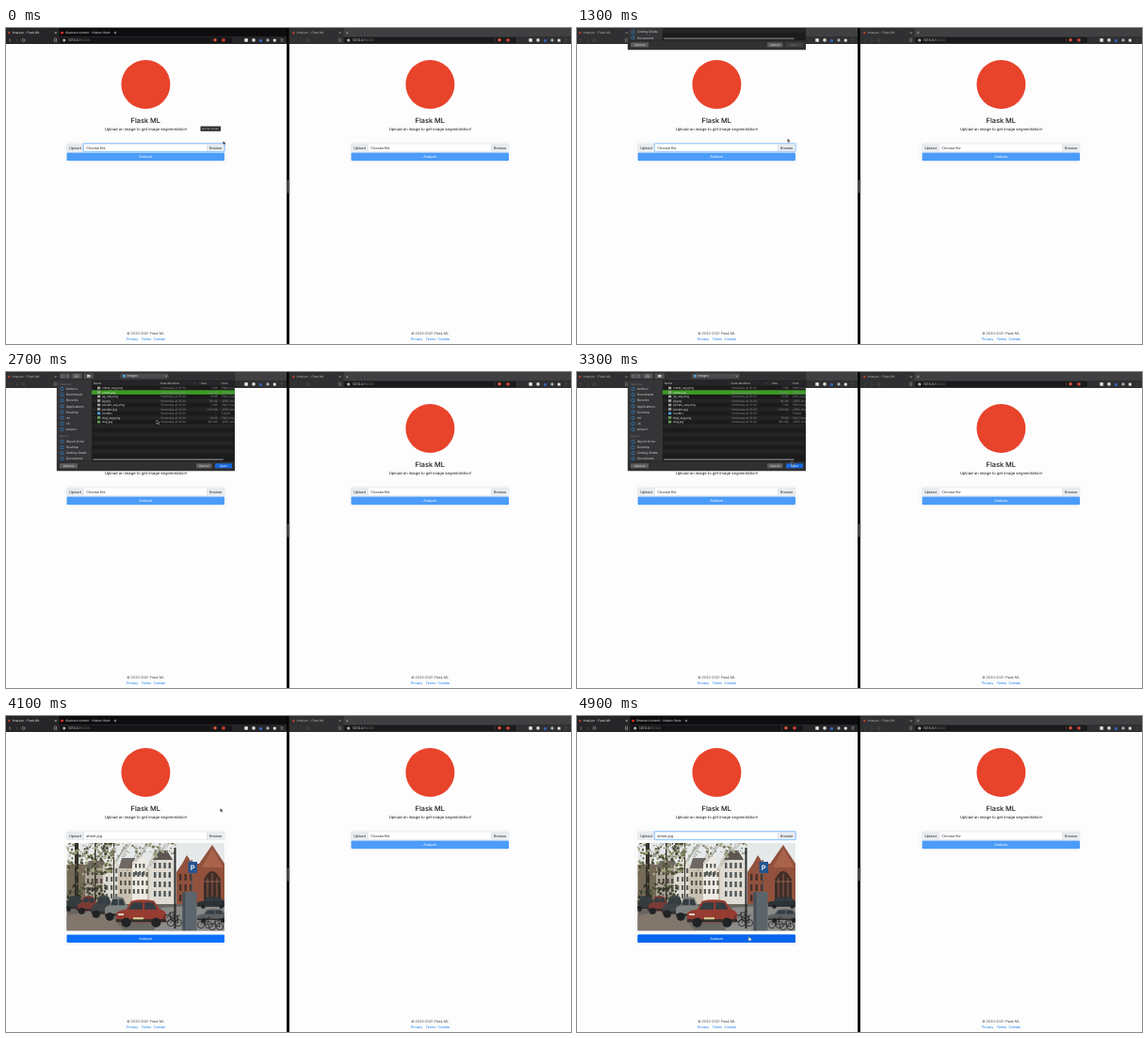
Animation, 600 px wide and 336 px high, one loop 5000 ms. Source, as an HTML page:

```html
<!DOCTYPE html>
<html lang="en">
<head>
<meta charset="utf-8">
<title>Flask ML</title>
<style>
html, body { margin: 0; width: 100%; height: 100%; overflow: hidden; background: #fff; }
svg { display: block; width: 100vw; height: 100vh; }
text { font-family: Inter, Roboto, sans-serif; text-rendering: geometricPrecision; white-space: pre; }
.loop { animation: 5s linear infinite; }
.cut { animation-timing-function: step-end; }
#tooltip { animation-name: tooltip; }
#cursor { animation-name: cursor; }
#arrow { animation-name: arrow; }
#hand { animation-name: hand; }
#focus { animation-name: focus; }
#sheet { animation-name: sheet; }
.selected { animation-name: selected; }
#hover { animation-name: hover; }
.idle { animation-name: idle; }
.before { animation-name: before; }
.after { animation-name: after; }

@keyframes tooltip { 0% { opacity: 1 } 3.8%, 100% { opacity: 0 } }
@keyframes before { 0% { opacity: 1 } 81.6%, 100% { opacity: 0 } }
@keyframes after { 0% { opacity: 0 } 81.6%, 100% { opacity: 1 } }
@keyframes idle { 0% { opacity: 0 } 25.8% { opacity: 1 } 81.6%, 100% { opacity: 0 } }
@keyframes selected { 0% { opacity: 0 } 45.8%, 100% { opacity: 1 } }
@keyframes arrow { 0% { opacity: 1 } 96.5%, 100% { opacity: 0 } }
@keyframes hand { 0% { opacity: 0 } 96.5%, 100% { opacity: 1 } }
@keyframes hover { 0%, 96% { opacity: 0 } 98%, 100% { opacity: 1 } }
@keyframes focus { 0%, 25.6% { opacity: 1 } 27.6%, 82.4% { opacity: 0 } 85.6%, 100% { opacity: 1 } }
@keyframes sheet {
  0%, 25.7% { transform: translateY(-110px); visibility: hidden }
  25.8% { transform: translateY(-90px); visibility: visible; animation-timing-function: ease-out }
  29.8%, 81.5% { transform: none; visibility: visible }
  81.6%, 100% { transform: none; visibility: hidden }
}
@keyframes cursor {
  0%, 2% { transform: translate(230.5px, 120px); animation-timing-function: ease-in-out }
  12%, 30% { transform: translate(223.5px, 117.5px); animation-timing-function: ease-in-out }
  39.8% { transform: translate(116px, 25.5px) }
  45% { transform: translate(114.5px, 21px); animation-timing-function: ease-in-out }
  53.8%, 56% { transform: translate(160px, 51px); animation-timing-function: ease-in-out }
  67% { transform: translate(229px, 96px) }
  78%, 80.8% { transform: translate(229px, 97.5px) }
  82%, 90% { transform: translate(227.5px, 98px); animation-timing-function: ease-in-out }
  97.8%, 100% { transform: translate(182px, 234.5px) }
}
</style>
</head>
<body>
<script>
const rect = (x, y, w, h, fill, more = '') =>
  `<rect x="${x}" y="${y}" width="${w}" height="${h}" fill="${fill}" ${more}/>`;
const dot = (x, y, r, fill) => `<circle cx="${x}" cy="${y}" r="${r}" fill="${fill}"/>`;
const line = (d, stroke, width = .5) =>
  `<path d="${d}" fill="none" stroke="${stroke}" stroke-width="${width}"/>`;
const shape = (d, fill) => `<path d="${d}" fill="${fill}"/>`;
// Text is placed by its vertical middle.
const text = (x, y, size, str, fill = '#212529', more = '') =>
  `<text x="${x}" y="${y + size * .36}" font-size="${size}" fill="${fill}" ${more}>${str}</text>`;
const middle = 'text-anchor="middle"';
const group = (body, attrs) => `<g ${attrs}>${body}</g>`;
const repeat = (n, draw) => Array.from({ length: n }, (_, i) => draw(i)).join('');

let seed = 7;
const random = () => (seed = seed * 16807 % 2147483647) / 2147483647;
const pick = list => list[Math.floor(random() * list.length)];

function cross(x, y, color) {
  return line(`M${x - 1} ${y - 1}l2 2m0 -2l-2 2`, color, .45);
}

function chrome(active, tabs) {
  const strip = active ? '#0d0d10' : '#404042';
  const bar = active ? '#262629' : '#303032';
  const ink = active ? '#ececec' : '#b8b8b8';
  const nav = active ? '#cfcfcf' : '#5c5c5e';
  let out = rect(-1.2, 0, 299.2, 9.5, strip) + rect(-1.2, 0, 57.7, 9.5, bar) + rect(-1.2, 9, 299.2, 8, bar) +
    rect(57, 9.9, 183, 6.2, active ? '#151517' : '#1b1b1d', 'rx="1"') +
    dot(3.3, 5, 1.2, '#c43d2d') + text(6.6, 5, 3.25, 'Analyze - Flask ML', ink) + cross(52.7, 5, ink) +
    line('M5 11.4l-1.7 1.5l1.7 1.5', nav) + line('M10.5 11.4l1.7 1.5l-1.7 1.5', '#5c5c5e') +
    `<circle cx="18.5" cy="12.9" r="1.5" fill="none" stroke="${nav}" stroke-width=".5"/>` +
    line('M51.5 11.2h2v3.5l-1-.8l-1 .8z', ink, .4) +
    dot(61.7, 12.9, 1.5, '#d0d0d0') + rect(61.5, 12.6, .5, 1.2, '#222') +
    text(66, 13, 3.5, '127.0.0.1<tspan fill="#77777a">:5000</tspan>', '#f2f2f2') +
    line('M217.5 10.5v5', '#55555a', .4) +
    dot(222, 12.7, 1.7, '#e05a38') + dot(231, 12.8, 1.9, '#c3402f') +
    rect(253.3, 11.2, 3.5, 3.5, '#e8e8e8') + dot(263, 12.9, 1.8, '#d9d9d9') +
    dot(270.5, 13.4, 1.6, '#3566bd') + dot(278, 12.9, 1.6, '#a9b4b4') +
    rect(283.8, 11.7, 2.9, 2.9, '#e3e3e3') +
    line('M291.5 11.6h3m-3 1.3h3m-3 1.3h3', nav, .4);
  const plus = tabs > 1 ? 116 : 60.3;
  if (tabs > 1) {
    out += rect(58.2, 3.9, 2.7, 2.4, '#e02b24') +
      text(63, 5, 3.2, 'Channel content - Vidarro Stu', ink) + cross(109.3, 5, ink);
  }
  return out + line(`M${plus - 1.3} 5h2.6m-1.3 -1.3v2.6`, ink, .5);
}

function field(label) {
  return rect(64.5, 122.9, 167.5, 8.5, '#fff', 'rx="1" stroke="#ced4da" stroke-width=".5"') +
    rect(64.7, 123.1, 17.6, 8.1, '#e9ecef') + rect(213.5, 123.1, 18.3, 8.1, '#e9ecef') +
    line('M82.3 123v8.5M213.5 123v8.5', '#ced4da') +
    text(73.4, 127.3, 3.75, 'Upload', '#25292d', middle) + text(85.3, 127.3, 3.75, label, '#25292d') +
    text(222.6, 127.3, 3.75, 'Browse', '#25292d', middle);
}

function button(y, color) {
  return rect(64.5, y, 167.5, 8.7, color, 'rx="1"') + text(148.2, y + 4.5, 3.7, 'Analyze', '#fff', middle);
}

function card(h) {
  return rect(62, 120.8, 172.3, h, '#fdfdfd', 'rx="1.2" stroke="#eff0f1" stroke-width=".5"');
}

const emptyForm = () => card(22.6) + field('Choose file') + button(132.6, '#4c9cf9');

function page() {
  const link = '#0470ee';
  return rect(-1.2, 16.5, 299.2, 320, '#fdfdfd') + dot(148.4, 60, 26, '#e8432b') +
    text(148.3, 98, 7.4, 'Flask ML', '#16191c', `${middle} font-weight="500"`) +
    text(148.4, 107.6, 4.15, 'Upload an image to get image segmentation!', '#16191c', middle) +
    text(148.2, 324.2, 3.7, '© 2020-2021 Flask ML', '#454a50', middle) +
    text(128, 330.8, 3.5, 'Privacy', link) + text(143.8, 330.8, 3.5, 'Terms', link) +
    text(156.6, 330.8, 3.5, 'Codwik', link);
}

function panes(x, y, cols, rows, dx, dy, w, h, color) {
  return repeat(cols * rows, i =>
    rect(x + i % cols * dx, y + Math.floor(i / cols) * dy, w, h, color));
}

function car(x, y, w, h, body) {
  const wheel = h * .17;
  return group(
    shape('M0 .5Q.05 .38 .2 .36L.3 .06Q.5 -.03 .76 .05L.88 .36Q1 .4 1 .56V.82H0Z', body) +
    shape('M.24 .36L.33 .11H.53V.36ZM.57 .11H.74L.82 .36H.57Z', '#343d42') +
    rect(0, .7, 1, .1, '#30302f'),
    `transform="translate(${x} ${y}) scale(${w} ${h})"`) +
    dot(x + w * .2, y + h * .82, wheel, '#202224') + dot(x + w * .8, y + h * .82, wheel, '#202224');
}

function bike(x, y) {
  return [0, 8].map(dx =>
    `<circle cx="${x + dx}" cy="${y}" r="3.6" fill="none" stroke="#222426" stroke-width=".8"/>`).join('') +
    line(`M${x} ${y}l3 -6h4l1 6l-4 -1l-1 -5m4 0l1 -2h2`, '#222426', .8);
}

function foliage(n, x, y, w, h, colors) {
  return repeat(n, () => dot(x + random() * w, y + random() * h, .5 + random() * 1.2, pick(colors)));
}

function photo() {
  const sky = rect(64, 135, 169, 94, '#e6e9ea');
  const houses =
    rect(64, 158, 22, 42, '#756a58') + rect(84, 160, 21, 40, '#aea596') +
    shape('M84 162L88 154H104L107 162Z', '#716961') +
    shape('M103 200V159L112 150L121 159V200Z', '#dcd9d0') +
    shape('M119 164L123 151H137L139 164Z', '#6f6762') + rect(119, 162, 39, 38, '#c9c0b1') +
    shape('M134 200V156L142 145L150 156V200Z', '#eceae2') +
    shape('M152 200V153L157 146H173L179 153V200Z', '#dfdbd2') +
    shape('M156 153L163 143H171L177 153Z', '#5d5651') +
    shape('M181 200V166L187 157L192 148L198 157H205L219 137L232 157V200Z', '#91513c') +
    shape('M208 161L219 141L231 161Z', '#a9634a') +
    panes(86, 164, 4, 3, 4.7, 9, 2.2, 5, '#4d4843') +
    panes(106, 162, 3, 4, 5, 9, 2.2, 5, '#5d6260') +
    panes(121, 166, 7, 3, 4.6, 9, 2.1, 5, '#55554f') +
    panes(137, 157, 3, 2, 4.2, 8, 2, 4.5, '#565c5a') +
    panes(157, 156, 4, 4, 5.2, 10, 2.4, 6, '#50585a') +
    panes(184, 168, 3, 3, 5.5, 11, 2.4, 7, '#43302a') +
    shape('M210 200V174Q219 156 228 174V200Z', '#3f2d28') +
    line('M214 198V172M219 198V167M224 198V172M210 176h18', '#b0735a', .7);
  const tree = (x, w, top = 135) => rect(x, top, w, 200 - top, '#342f28');
  const twigs = repeat(20, i =>
    line(`M${68 + i * 5} ${165 - i % 4 * 5}q${6 + i % 5} -14 ${12 + i % 3 * 5} -${22 + i % 3 * 3}`, '#5a574b', .35));
  const leaves = foliage(190, 64, 135, 50, 34, ['#5f6342', '#7d8057', '#484b36', '#a3a583']) +
    foliage(70, 110, 135, 72, 15, ['#77785b', '#a2a48a']) +
    foliage(90, 64, 178, 42, 20, ['#3d4431', '#525a3c', '#2f332a']);
  const ground = rect(64, 200, 169, 30, '#69655f') +
    shape('M64 212L104 205L126 228.5H64Z', '#81766c') + shape('M165 204L233 199V229H157Z', '#8b8b89');
  const cars = car(62, 191, 20, 17, '#343b3d') + car(76, 191, 22, 20, '#7c3a34') +
    car(91, 191, 24, 24, '#3f4546') + car(105, 192, 26, 26, '#7d8280') + car(203, 192, 32, 13, '#2c3338') +
    car(203, 205, 34, 15, '#5b6063') + car(117, 195, 53, 30, '#963c31') +
    rect(119, 210, 6, 2, '#d9d0c3') + rect(135, 214, 11, 2.3, '#d3c28b');
  const street = bike(171, 215) + bike(175, 220) + rect(178.5, 140, 2, 86, '#292b2b') +
    rect(196.6, 153, 1.3, 39, '#52585c') + rect(193.6, 155, 9.4, 12, '#24548f') +
    text(198.3, 161.2, 7.5, 'P', '#e8eef5', `${middle} font-weight="700"`) +
    rect(187.5, 187, 15, 41.5, '#5c646c') + rect(187.5, 187, 3, 41.5, '#474f57') +
    bike(207, 222) + bike(219, 224);
  return `<clipPath id="frame">${rect(64.5, 135, 167.5, 93.3, '#000')}</clipPath>` +
    group(sky + houses + twigs + tree(73, 4) + tree(94, 1.5) + tree(114, 1) + leaves + ground + cars + street,
      'clip-path="url(#frame)"');
}

function sheet() {
  const pale = '#c9c9cb', dim = '#89898c', blue = '#3292e8';
  const places = ['belnoru', 'Downloads', 'Recents', 'Applications', 'Desktop', 'int', 'v5', 'project'];
  const cloud = ['Skyvol Drive', 'Desktop', 'Coding Challe...', 'Documents'];
  const files = [['street_seg.png', '7 KB'], ['street.jpg', '338 KB'], ['jig_seg.png', '9 KB'],
    ['jig.jpg', '58 KB'], ['people_seg.png', '7 KB'], ['people.jpg', '205 KB'],
    ['models', '--'], ['dog_seg.png', '15 KB'], ['dog.jpg', '681 KB']];
  const place = (name, y) => rect(58, y - 1.5, 3, 3, 'none', `rx=".7" stroke="${blue}" stroke-width=".6"`) +
    text(64, y, 3.25, name, '#dadadc');
  const row = ([name, size], i) => {
    const y = 17 + i * 4.5;
    const folder = name === 'models';
    const kind = folder ? 'Folder' : name.endsWith('png') ? 'PNG image' : 'JPEG image';
    return (folder ? text(92.6, y, 2.6, '▸', dim) : '') +
      rect(97, y - 1.3, 3.2, 2.6, folder ? '#4ba7df' : i > 6 ? '#67a25b' : '#a2a39d') +
      text(102, y, 3.15, name, '#e0e0e1') + text(164, y, 3.1, 'Yesterday at 21:00', dim) +
      text(224.5, y, 3.1, size, dim, 'text-anchor="end"') + text(229, y, 3.1, kind, dim);
  };
  const key = (x, y, w, h, fill, label = '', ink = '#e4e4e4') =>
    rect(x, y, w, h, fill, 'rx="1"') + text(x + w / 2, y + h / 2, 3.2, label, ink, middle);
  const heads = [[93, 'Name'], [164, 'Date Modified'], [207, 'Size'], [229, 'Kind']];
  return `<clipPath id="edge">${rect(54, -1, 188.7, 106, '#000')}</clipPath>` +
    rect(53.6, -1, 189.5, 106.4, '#111', 'opacity=".4" rx="1"') +
    group(
      rect(54, -1, 189, 106, '#303032') + rect(54, 9, 36.6, 86, '#353538') +
      rect(91, 9, 152, 86, '#1b1b1c') + rect(91, 9.5, 152, 5, '#262628') +
      key(57, 1.5, 11, 5.5, '#515154') + line('M60.5 2.8l-1.3 1.4l1.3 1.4M65 2.8l1.3 1.4l-1.3 1.4', '#b7b7b9') +
      key(69.3, 1.5, 11.5, 5.5, '#515154') + line('M72.5 3h5m-5 1.3h5m-5 1.3h5', pale, .4) +
      key(82.8, 1.5, 10, 5.5, '#515154') + rect(86, 3, 3.5, 2.6, pale) +
      key(121.5, 1.5, 51, 5.5, '#4b4b4e') + rect(124, 3, 3, 2.5, '#4ba7df') +
      text(128.5, 4.2, 3.4, 'images', '#eee') + line('M168.5 3.6l1.3 1.3l1.3 -1.3', '#e2e2e2') +
      text(57, 12.8, 2.9, 'Favorites', '#7d7d80') + places.map((name, i) => place(name, 18 + i * 6.15)).join('') +
      text(57, 68, 2.9, 'Skyvol', '#7d7d80') + cloud.map((name, i) => place(name, 74 + i * 6.1)).join('') +
      heads.map(([x, name]) => text(x, 12.2, 3, name, pale)).join('') +
      line('M162 10v4M205 10v4M227 10v4', '#555', .3) + line('M199.5 11.5l1 1l1 -1', dim, .4) +
      repeat(8, i => rect(91, 19.3 + i * 9, 152, 4.5, '#242426')) +
      group(rect(91, 19.3, 152, 4.6, '#3c9b24'), 'class="loop cut selected"') +
      files.map(row).join('') +
      rect(92, 92.2, 139, 1.7, '#68686b', 'rx=".8"') +
      rect(54, 95, 189, 10, '#303032') + line('M54 95h189', '#161617', .4) +
      key(57, 97.3, 19, 5, '#5d5d60', 'Options') + key(202, 97.3, 16.5, 5, '#5d5d60', 'Cancel') +
      key(222, 97.3, 18, 5, '#404043', 'Open', '#737376') +
      group(key(222, 97.3, 18, 5, '#1767dc', 'Open', '#fff'), 'class="loop cut selected"'),
      'clip-path="url(#edge)"');
}

const focusRing =
  rect(82.2, 122.7, 150, 8.9, 'none', 'rx="1" stroke="#cfe6ff" stroke-width="1.5"') +
  rect(82.2, 122.7, 150, 8.9, 'none', 'rx="1" stroke="#6aaefa" stroke-width=".6"');

const leftWindow = page() +
  group(emptyForm(), 'class="loop cut before"') +
  group(card(122) + field('street.jpg') + photo() + button(232.4, '#0a70fb') +
    group(button(232.4, '#0565ec'), 'id="hover" class="loop"'), 'class="loop cut after"') +
  group(focusRing, 'id="focus" class="loop"') +
  chrome(true, 2) + group(chrome(false, 2), 'class="loop cut idle"');

const tooltip = rect(206.5, 104.6, 21.5, 5.2, '#2c2c2e', 'rx=".5"') +
  text(217.2, 107.2, 2.6, 'No file chosen', '#e8e8e8', middle);

const arrow = '<path d="M0 0V4.1L1 3.2L1.7 4.8L2.4 4.5L1.7 2.9H3Z" fill="#050505" stroke="#fff" stroke-width=".35"/>';
const hand = '<path d="M.2 .3Q.7 -.3 1.1 .3V1.6L2.9 2Q3.3 2.2 3.2 3L2.7 4.5H.7L-.7 2.7Q-.6 2.1 .2 2.6Z" fill="#fff" stroke="#111" stroke-width=".3"/>';

document.body.innerHTML = `<svg viewBox="0 0 600 336" preserveAspectRatio="none">` +
  leftWindow +
  group(page() + emptyForm() + chrome(false, 1), 'transform="translate(302 0)"') +
  rect(298, 0, 2.9, 336, '#050505') + rect(298.8, 161.5, 1.2, 14, '#77777a', 'rx=".6"') +
  group(tooltip, 'id="tooltip" class="loop cut"') +
  group(sheet(), 'id="sheet" class="loop"') +
  group(group(arrow, 'id="arrow" class="loop cut"') + group(hand, 'id="hand" class="loop cut"'),
    'id="cursor" class="loop"') + '</svg>';
</script>
</body>
</html>
```
